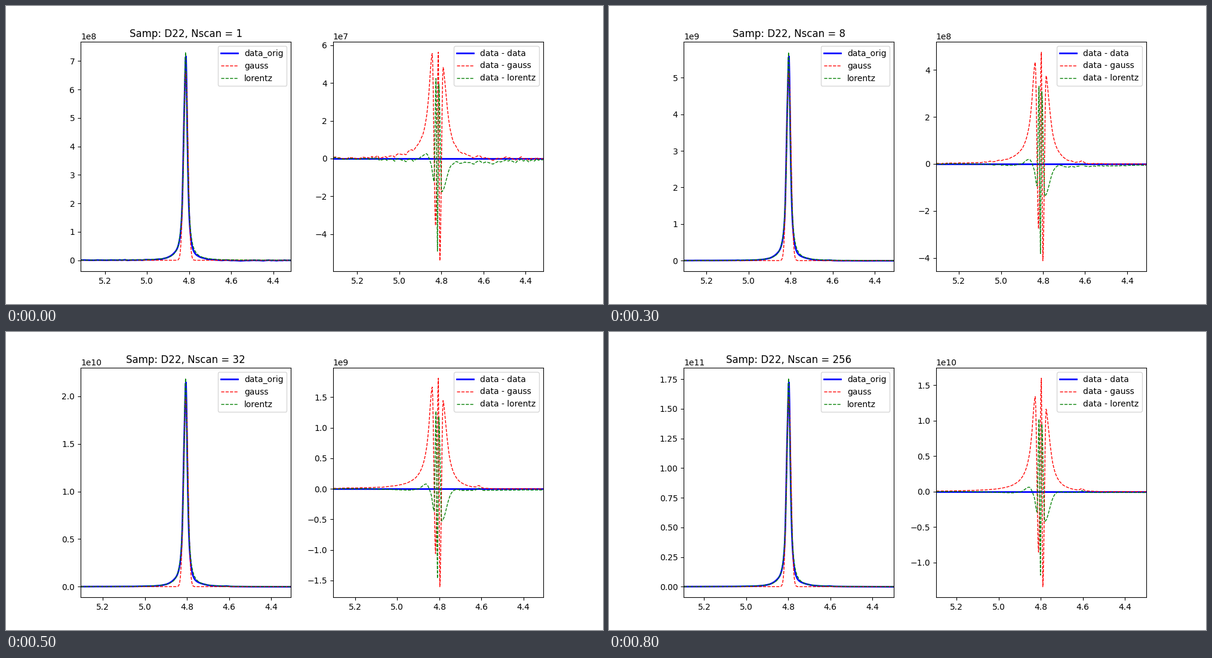
These frames come from a looping animation (1000x500 px, 0.9 s). A matplotlib script:

```python
import numpy as np
import matplotlib.pyplot as plt
from matplotlib.animation import FuncAnimation

FRAMES = 9              # the scan count doubles on every frame
STEP = 0.00225          # ppm between two samples
X = np.arange(-222, 222) + 0.5      # sample offset from the window centre

# Slow drift of the fit over log2(scan count)
KNOTS = [0, 2, 4, 6, 7, 8]
GAIN = [7.31, 7.255, 6.99, 6.70, 6.655, 6.87]            # 1e8 per scan
CREST = [.0770, .0837, .0833, .0821, .0946, .0908]       # highest gauss residual
DIP = [-.0740, -.0717, -.0731, -.0734, -.0758, -.0763]   # lowest gauss residual


def smooth(points):
    """Monotone cubic curve through the points, sampled on X."""
    px, py = np.array(points, float).T
    h = np.diff(px)
    d = np.diff(py) / h
    m = np.zeros_like(py)
    same = d[:-1] * d[1:] > 0
    a, b = d[:-1][same], d[1:][same]
    m[1:-1][same] = 2 * a * b / (a + b)
    i = np.clip(np.searchsorted(px, X) - 1, 0, len(h) - 1)
    t = (X - px[i]) / h[i]
    return ((1 + 2 * t) * (1 - t) ** 2 * py[i]
            + t * (1 - t) ** 2 * h[i] * m[i]
            + t ** 2 * (3 - 2 * t) * py[i + 1]
            + t ** 2 * (t - 1) * h[i] * m[i + 1])


def lorentz(x):
    return 1 / (1 + (x / 4.35) ** 2)


def bell(x, width):
    return np.exp(-(x / width) ** 2)


def baseline(k):
    """Noise that averages out with more scans, and a faint side peak."""
    grid = np.arange(-224, 225, 4)
    rng = np.random.default_rng(20 + k)
    hiss = np.interp(X, grid, rng.normal(0, 5.5e-4 / 2 ** (k / 2), len(grid)))
    return hiss * (1 - bell(X, 40)) + .0015 * bell(X - 86, 5)


def gauss_residual(k):
    crest, dip = np.interp(k, KNOTS, CREST), np.interp(k, KNOTS, DIP)
    far = [20, 25, 32, 40, 50, 70, 95, 130, 223]
    left = [(-x, lorentz(x)) for x in reversed(far)]
    right = [(x, lorentz(x + 1) * max(0, 1 - x / 126)) for x in far]
    core = [(-16.5, .063), (-12.5, .076), (-5.5, -.0485), (.5, crest),
            (3.5, dip), (10.5, .066), (14, .056)]
    return smooth(left + core + right)


def lorentz_residual(k):
    left = [(-223, 0), (-150, 0), (-60, -.001), (-42, 0), (-25.5, .0035),
            (-15, -.004)]
    core = [(-8.5, -.0165), (-4.5, .058), (-1.5, -.067), (.5, .03),
            (1.5, .054), (7.5, -.024)]
    right = [(x, -.024 * bell(x - 7.5, 14) - .0008 * (x > 45))
             for x in range(11, 224, 4)]
    tail = .0022 * max(0, 1 - k / 6)
    return smooth(left + core + right) - np.interp(X, [12, 30, 90, 222],
                                                   [0, tail, tail, 0])


def plot(ax, centre, curves, labels):
    ax.clear()
    styles = [("b-", 2), ("r--", 1), ("g--", 1)]
    for y, label, (style, width) in zip(curves, labels, styles):
        ax.plot(centre - STEP * X, y, style, lw=width, label=label)
    ax.set_xlim(centre + .5, centre - .5)
    ax.legend(loc="upper right")


def draw(k):
    # The peak moves by whole samples, pausing once
    shift = np.interp(k, [0, 4, 6, 7, 8], [0, 4, 5, 7, 8])
    centre = 4.8157 - STEP * shift
    height = np.interp(k, KNOTS, GAIN) * 1e8 * 2 ** k

    base = baseline(k)
    red = gauss_residual(k) + base
    green = lorentz_residual(k) + base
    fit = lorentz(X + .5)
    gauss = .91 * bell(X, 6.6)

    plot(left_ax, centre, [height * (fit + green), height * gauss, height * fit],
         ["data_orig", "gauss", "lorentz"])
    left_ax.set_title(f"Samp: D22, Nscan = {2 ** k}")
    plot(right_ax, centre, [0 * X, height * red, height * green],
         ["data - data", "data - gauss", "data - lorentz"])


fig, (left_ax, right_ax) = plt.subplots(1, 2, figsize=(10, 5), dpi=100)
anim = FuncAnimation(fig, draw, frames=FRAMES, interval=100, repeat=True)
plt.show()
```
